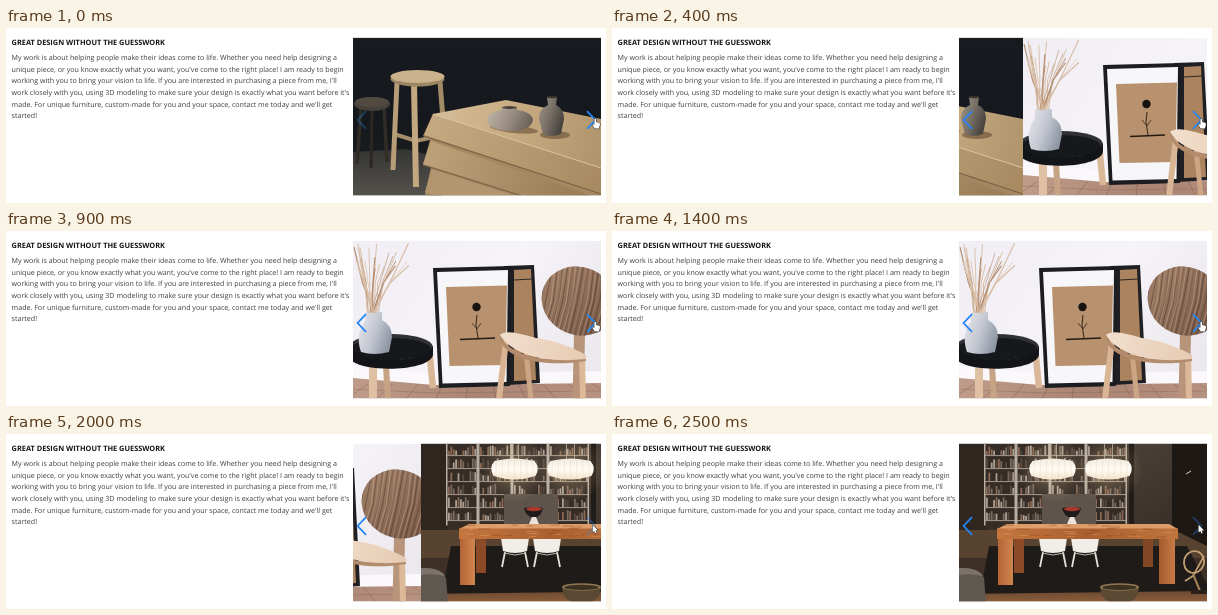
These frames come from a looping animation (600x175 px, 2600 ms). An HTML page with a canvas:

```html
<!DOCTYPE html>
<html lang="en">
<head>
<meta charset="utf-8">
<title>Furniture carousel</title>
<style>
  html, body { margin: 0; width: 100%; height: 100%; overflow: hidden; background: #fff; }
  body { position: relative; font-family: "Open Sans", "Noto Sans", sans-serif; text-rendering: geometricPrecision; }
  canvas { position: absolute; left: 0; top: 0; width: 600px; height: 175px; }
  h1, p { position: absolute; left: 5.6px; margin: 0; white-space: nowrap; }
  h1 { top: 9.2px; font-size: 7.38px; line-height: 12px; font-weight: 700; color: #151515; }
  p { top: 25.4px; font-size: 7.1px; line-height: 11.55px; color: #3e3e3e; }
</style>
</head>
<body>
<canvas id="stage"></canvas>
<h1>GREAT DESIGN WITHOUT THE GUESSWORK</h1>
<p>My work is about helping people make their ideas come to life. Whether you need help designing a<br>
unique piece, or you know exactly what you want, you've come to the right place! I am ready to begin<br>
working with you to bring your vision to life. If you are interested in purchasing a piece from me, I'll<br>
work closely with you, using 3D modeling to make sure your design is exactly what you want before it's<br>
made. For unique furniture, custom-made for you and your space, contact me today and we'll get<br>
started!</p>
<script>
const LOOP = 2600, STEP = 100, SPEED = 300;
const CLICKS = [266, 1870];
const X = 347, Y = 9.5, W = 248, H = 158;

const canvas = document.getElementById('stage');
const ctx = canvas.getContext('2d');
const dpr = window.devicePixelRatio || 1;
canvas.width = 600 * dpr;
canvas.height = 175 * dpr;

function rect(fill, x, y, w, h) {
  ctx.fillStyle = fill;
  ctx.fillRect(x, y, w, h);
}

function trace(pts) {
  ctx.beginPath();
  for (let i = 0; i < pts.length; i += 2) ctx.lineTo(pts[i], pts[i + 1]);
}

function poly(fill, ...pts) {
  trace(pts);
  ctx.fillStyle = fill;
  ctx.fill();
}

function line(color, width, ...pts) {
  trace(pts);
  ctx.strokeStyle = color;
  ctx.lineWidth = width;
  ctx.stroke();
}

function oval(fill, x, y, rx, ry, turn = 0) {
  ctx.beginPath();
  ctx.ellipse(x, y, rx, ry, turn, 0, 7);
  ctx.fillStyle = fill;
  ctx.fill();
}

function shape(fill, path) {
  ctx.fillStyle = fill;
  ctx.fill(new Path2D(path));
}

function fade(x0, y0, x1, y1, ...colors) {
  const g = ctx.createLinearGradient(x0, y0, x1, y1);
  colors.forEach((c, i) => g.addColorStop(i / (colors.length - 1), c));
  return g;
}

function random(seed) {
  return () => (seed = (seed * 16807) % 2147483647) / 2147483647;
}

function stoolScene() {
  rect(fade(X, Y, X, Y + H, '#171b20', '#15181c', '#1d1f20'), X, Y, W, H);
  poly(fade(X, 120, X, 168, '#343432', '#54524c'), X, 124, 400, 121, 436, 130, 436, 168, X, 168);

  // small stool in shadow
  line('#302c26', 3.5, 355, 80, 351, 136);
  line('#302c26', 3.5, 378, 80, 381, 134);
  line('#2b2823', 3, 366, 82, 365, 140);
  oval('#45403a', 366, 76, 18, 7);
  oval('#514a41', 366, 74, 17, 5);

  // tall stool
  line('#a28a67', 5, 434, 54, 440, 128);
  line('#a58d6b', 4, 388, 106, 410, 113, 437, 107);
  line('#b79d78', 5, 391, 54, 387, 142);
  line('#c2a780', 6, 408, 56, 410, 159);
  oval('#9c8562', 411.5, 51, 27, 7.5);
  oval('#cab28c', 411.5, 48.5, 27, 6.5);

  // sideboard
  poly('#a48760', 427, 86, 417, 108, 424, 112, 417, 137, 425, 139, 419, 166, 420, 168, 595, 168, 595, 140);
  poly(fade(420, 90, 595, 165, '#c6ab82', '#a68961'), 427, 86, 418, 107, 595, 165, 595, 141);
  poly(fade(420, 115, 560, 168, '#bea27a', '#9b7f59'), 425, 113, 417, 136, 520, 168, 586, 168);
  poly('#b2966f', 426, 141, 419, 164, 432, 168, 509, 168);
  line('#756044', 1, 418, 108, 595, 166);
  line('#756044', 1, 417, 137, 516, 168);
  poly(fade(430, 80, 595, 130, '#d5bd98', '#c6a97f', '#af946c'), 427, 86, 500, 72, 595, 91, 595, 140);
  line('#dfc9a5', 1, 427, 86, 595, 140);

  // vases
  oval('rgba(70,50,30,.45)', 508, 101, 24, 4, 0.1);
  oval('rgba(70,50,30,.45)', 549, 107, 15, 4);
  shape(fade(481, 80, 527, 102, '#c1b7a9', '#988d80', '#5f574f'),
    'M496 79H511L511 82C522 83 527 88 527 92C526 100 516 103 504 103C491 103 481 99 481 92C481 87 487 83 496 82Z');
  oval('#4b443d', 503.5, 79.5, 7.5, 1.5);
  shape(fade(533, 80, 558, 88, '#978e82', '#766e65', '#4a4540'),
    'M541 69H551L550 77C556 80 558 85 558 91L555 106Q545 110 537 106L533 91C533 84 536 80 542 77Z');
  oval('#37332f', 546, 69, 5, 1.3);
}

function chairScene() {
  rect(fade(X, Y, 595, 168, '#f0eef4', '#f6f4f8', '#e9e6ec'), X, Y, W, H);
  poly('#faf8fa', X, 134, 428, 143, 595, 140, 595, 153, 428, 154, X, 147);
  poly(fade(X, 150, 595, 168, '#bf9c8a', '#aa8473', '#b89280'), X, 147, 428, 154, 595, 152, 595, 168, X, 168);
  for (let i = 0; i < 10; i++) line('rgba(95,60,48,.4)', .7, 362 + i * 25, 153, 340 + i * 30, 168);
  line('rgba(95,60,48,.3)', .7, X, 158, 428, 162, 595, 160);

  // framed prints
  poly('#202024', 498, 35, 528, 34, 534, 152, 502, 154);
  poly('#ab845f', 508, 39, 525, 38, 530, 149, 508, 150);
  line('#2c2825', 1.2, 508, 49, 526, 48);
  line('#2c2825', 1.2, 508, 123, 529, 122);
  poly('#1c1d21', 427, 37, 505.5, 35, 504, 155, 433, 157);
  poly('#f7f6f9', 431, 41, 502, 39, 500.5, 151, 436.5, 152.5);
  poly('#b8916f', 440, 56, 501, 54.5, 499.5, 134, 443.5, 135);
  oval('#17140f', 470.5, 76, 4.2, 4.2);
  line('#352719', 1, 471, 84, 470, 94, 472, 107);
  line('#352719', .8, 466, 92, 471, 98, 475, 92);
  line('#211a13', 1.3, 454, 108.5, 489, 107);

  // dried reeds
  const rnd = random(17);
  for (let i = 0; i < 24; i++) {
    const tip = 348 + rnd() * 55, top = 9 + rnd() * 30;
    line(i % 3 ? '#d9bfa8' : '#b58e70', .6 + rnd() * .7, 362 + rnd() * 11, 88, (tip + 367) / 2 - 1, 52, tip, top);
  }

  // tray table with vase
  line('#d9b799', 6.5, 423, 116, 427, 157);
  line('#e0c0a3', 8, 367, 132, 367, 168);
  line('#c6a384', 6, 380, 135, 382, 168);
  oval('#303137', 385, 116, 42, 13);
  oval('#17181c', 385, 118, 40, 11);
  shape(fade(353, 90, 387, 102, '#e3e3e9', '#c3c7d0', '#8f97a5'),
    'M359 81Q367 83 376 81L376 89Q386 94 386 106L383 121Q368 125 355 121Q349 104 359 90Z');
  shape('#131418', 'M343 113C346 134 424 134 427 114V124C423 142 347 142 343 126Z');

  // chair
  line('#b8947a', 11, 574, 82, 572, 168);
  ctx.save();
  ctx.beginPath();
  ctx.ellipse(573, 70, 38, 34, .4, 0, 7);
  ctx.clip();
  rect(fade(535, 40, 600, 105, '#a28069', '#8d6d58', '#765846'), 530, 30, 80, 80);
  for (let i = 0; i < 34; i++) {
    const x = 532 + i * 2.6;
    line(i % 2 ? 'rgba(62,40,28,.4)' : 'rgba(222,192,166,.35)', .5 + rnd(), x + 7, 32, x + rnd() * 4, 70, x - 9, 110);
  }
  ctx.restore();
  line('#d9b595', 6, 500, 110, 493, 168);
  line('#cca585', 5, 520, 121, 525, 168);
  line('#dbb999', 6, 576, 126, 577, 168);
  shape('#b38b6d', 'M494 104C503 124 534 132 580 127V130C545 136 502 131 494 109Z');
  shape(fade(495, 100, 580, 130, '#f2dfcd', '#e6cbb3'),
    'M494 104C500 98 516 103 530 107C550 110 566 116 580 124V128C544 132 508 126 494 104Z');
}

function lamp(x) {
  line('#c6b8a5', .7, x - 4, Y, x - 4, 26);
  line('#c6b8a5', .7, x + 4, Y, x + 4, 26);
  const glow = ctx.createRadialGradient(x, 35, 8, x, 35, 34);
  glow.addColorStop(0, 'rgba(255,225,170,.25)');
  glow.addColorStop(1, 'rgba(255,225,170,0)');
  oval(glow, x, 35, 34, 34);
  shape(fade(x, 25, x, 46, '#f3ebdf', '#fffcf6', '#f3e2c8'),
    `M${x - 20} 27Q${x} 22 ${x + 20} 27Q${x + 26} 34 ${x + 21} 42Q${x} 49 ${x - 21} 42Q${x - 26} 34 ${x - 20} 27Z`);
  for (let i = -3; i < 4; i++) line('rgba(200,175,135,.3)', .6, x + i * 6, 26, x + i * 6.3, 44);
}

function shelves(x, w, rnd) {
  rect('#352c26', x, Y, w, 82);
  for (let y = 21; y < 92; y += 13) {
    for (let bx = x + 2; bx < x + w - 3; bx += 2.4) {
      const h = 4 + rnd() * 6;
      if (rnd() > .35) rect(['#786a5e', '#aa9f92', '#554940', '#8a6854'][Math.floor(rnd() * 4)], bx, y - h, 1.8, h);
    }
    rect('#9a8e82', x, y, w, 1.1);
  }
  rect('#b8ada1', x, Y, 1.5, 82);
  rect('#b8ada1', x + w - 1.5, Y, 1.5, 82);
}

function chair(x) {
  for (const side of [-1, 1]) line('#e6e2dc', 1.8, x + side * 10, 118, x + side * 13, 133);
  shape('#f1ede8', `M${x - 14} 104H${x + 14}L${x + 12} 117Q${x} 121 ${x - 12} 117Z`);
  line('#bdb5ab', 1, x - 11, 119, x, 121, x + 11, 119);
}

function tableScene() {
  const rnd = random(91);
  rect(fade(X, Y, X, Y + H, '#3d322b', '#382d26', '#433327'), X, Y, W, H);
  rect('#302620', X, Y, 27, 96);
  shelves(372, 32, rnd);
  shelves(404, 34, rnd);
  shelves(438, 36, rnd);
  shelves(474, 41, rnd);
  rect('#5e544b', 430, 60, 54, 32);
  rect(fade(515, Y, 560, 90, '#4b4037', '#3a3029'), 515, Y, 47, 92);
  rect('#221c18', 517, Y, 5, 95);
  rect('#1e1814', 560, Y, 35, 108);
  line('#d9d2c8', 1, 574, 40, 579, 37);
  poly('#584331', X, 96, 562, 96, 595, 112, 595, 124, X, 124);
  poly('#1f1b18', 377, 112, 575, 112, 595, 150, 595, 160, 368, 160);
  poly(fade(X, 157, X, 168, '#6d4a32', '#8b5d3a'), X, 160, 595, 157, 595, 168, X, 168);

  chair(441);
  chair(473);

  // dining table
  rect('#8c4b26', 402, 104, 10, 35);
  rect('#824826', 531, 104, 10, 29);
  rect(fade(385, 100, 402, 100, '#b26234', '#d28850'), 386, 97, 15, 54);
  rect(fade(547, 100, 564, 100, '#a35a2d', '#ca7d47'), 547, 97, 16, 53);
  poly('#dc9c68', 395, 90, 557, 90, 566, 95, 385, 95);
  rect(fade(385, 95, 566, 105, '#c5763f', '#ab602f', '#c0743d'), 385, 94.5, 181, 10.5);
  for (let i = 0; i < 34; i++) {
    const x = 387 + rnd() * 166, y = 91 + rnd() * 13;
    line(i % 2 ? 'rgba(111,50,22,.5)' : 'rgba(244,186,128,.45)', .7, x, y, x + 5 + rnd() * 8, y);
  }

  // bowl on the table
  shape('#201b1b', 'M450 74Q460 72 469 74Q467 83 460 84Q452 83 450 74Z');
  oval('#a7392f', 460, 75, 8, 2.2);
  poly('#e9e3dc', 458, 83, 462, 83, 465, 90, 455, 90);

  lamp(440.5);
  lamp(496.5);

  // foreground
  shape('#5f5851', 'M347 134Q366 133 372 144L374 168H347Z');
  shape('#7b736b', 'M347 134Q366 133 371 142Q358 139 347 141Z');
  shape('#5c4933', 'M488 153H527Q526 166 517 168H498Q489 166 488 153Z');
  oval('#8e7851', 507.5, 153, 19.5, 3.8);
  oval('#3d3123', 507.5, 153.4, 17, 2.6);
  ctx.strokeStyle = '#c4a173';
  ctx.lineWidth = 1.8;
  ctx.beginPath();
  ctx.ellipse(582, 128, 10, 11, .3, 0, 7);
  ctx.stroke();
  line('#c4a173', 1.6, 573, 147, 581, 142, 592, 122);
  line('#a58256', 2, 581, 140, 588, 157);
  rect('#2a201a', 579, 156, 16, 4);
}

const scenes = [stoolScene, chairScene, tableScene];

// cubic-bezier(.25, .1, .25, 1)
function ease(p) {
  if (p <= 0) return 0;
  if (p >= 1) return 1;
  const curve = (a, b, s) => 3 * a * s * (1 - s) ** 2 + 3 * b * s * s * (1 - s) + s ** 3;
  let lo = 0, hi = 1;
  for (let i = 0; i < 24; i++) {
    const mid = (lo + hi) / 2;
    if (curve(.25, .25, mid) < p) lo = mid; else hi = mid;
  }
  return curve(.1, 1, lo);
}

function chevron(x, dir, off) {
  ctx.globalAlpha = off ? .35 : 1;
  line('#2486f5', 1.8, x - dir * 4, 83.2, x + dir * 4.4, 92, x - dir * 4, 100.8);
  ctx.globalAlpha = 1;
}

function pointer(hand) {
  const path = new Path2D(hand
    ? 'M588.4 91.2Q589.3 90.2 590.1 91.2V94L593.2 94.8Q594.2 95.2 593.9 97L592.9 100.6H588.8L586.2 96.8Q586.6 95.6 588.4 96.8Z'
    : 'M586.6 90.8V98.4L588.3 96.9L589.5 99.4L590.7 98.8L589.6 96.4H591.9Z');
  ctx.strokeStyle = '#222';
  ctx.lineWidth = 1;
  ctx.stroke(path);
  ctx.fillStyle = '#fff';
  ctx.fill(path);
}

function draw(t) {
  const pos = CLICKS.reduce((sum, start) => sum + ease((t - start) / SPEED), 0);
  const active = CLICKS.filter(start => t >= start).length;
  ctx.setTransform(dpr, 0, 0, dpr, 0, 0);
  ctx.clearRect(0, 0, 600, 175);
  ctx.save();
  ctx.beginPath();
  ctx.rect(X, Y, W, H);
  ctx.clip();
  scenes.forEach((scene, i) => {
    const shift = Math.round((i - pos) * W);
    if (Math.abs(shift) >= W) return;
    ctx.save();
    ctx.translate(shift, 0);
    ctx.beginPath();
    ctx.rect(X, Y, W, H);
    ctx.clip();
    scene();
    ctx.restore();
  });
  ctx.restore();
  chevron(356, -1, active === 0);
  chevron(585, 1, active === 2);
  pointer(active < 2);
}

const begin = performance.now();
function tick() {
  const t = (performance.now() - begin) % LOOP;
  draw(Math.floor(t / STEP) * STEP);
  requestAnimationFrame(tick);
}
tick();
</script>
</body>
</html>
```
